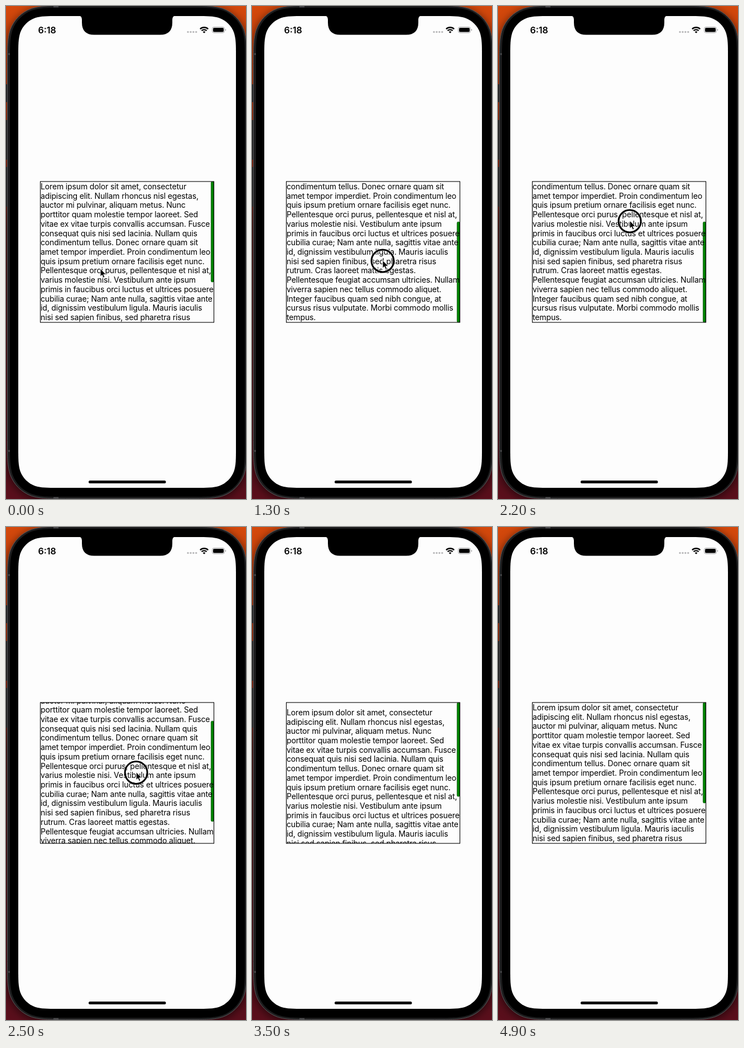
An HTML page for the animation above (5 s loop, 430x882 px).

```html
<!DOCTYPE html>
<html lang="en">
<head>
<meta charset="utf-8">
<title>Scroll indicator</title>
<style>
  html, body { margin: 0; width: 100%; height: 100%; overflow: hidden; background: #000; }
  svg { display: block; width: 430px; height: 882px; }
  text { font-family: Inter, "Open Sans", sans-serif; fill: #000; }
  #copy { font-size: 14px; letter-spacing: -0.14px; }
  #body { filter: drop-shadow(0 3px 8px rgba(0, 0, 0, .6)); }
</style>
</head>
<body>
<svg viewBox="0 0 430 882">
  <defs>
    <linearGradient id="wall" x2="0" y2="1">
      <stop offset="0" stop-color="#d4490c"/>
      <stop offset=".2" stop-color="#b5340a"/>
      <stop offset=".35" stop-color="#8a200c"/>
      <stop offset=".45" stop-color="#4a1210"/>
      <stop offset="1" stop-color="#5a0f1c"/>
    </linearGradient>
    <clipPath id="view"><rect x="61.5" y="314" width="311" height="252"/></clipPath>
  </defs>

  <rect width="430" height="882" fill="url(#wall)"/>
  <g fill="#2b2b2b">
    <rect y="140" width="4" height="32"/>
    <rect y="204" width="4" height="71"/>
    <rect y="288" width="4" height="71"/>
  </g>
  <path id="body" fill="#1d1d1e" stroke="#59595b"/>
  <path d="M85 1h9M85 880h9M4 86h3M4 796h3" stroke="#48484a" stroke-width="3"/>
  <path id="bezel"/>
  <path id="screen" fill="#fdfdfd"/>
  <path d="M130 17q6 1 6 7v5.500q0 22 22 22h118q22 0 22-22v-5.500q0-6 6-7z"/>

  <text x="57.5" y="49" font-size="16" font-weight="600">6:18</text>
  <g id="signal" fill="#b9b9bb"></g>
  <path d="M347.8 41.2a10.3 10.3 0 0 1 14.4 0M350.5 44.2a6.5 6.5 0 0 1 9 0"
    fill="none" stroke="#000" stroke-width="2.3"/>
  <path d="M352.6 46.2a3.6 3.6 0 0 1 4.8 0l-2.4 2.6z"/>
  <rect x="369.5" y="37.500" width="22" height="10.500" rx="3.300" fill="none" stroke="#a5a5a7"/>
  <rect x="371" y="39" width="19" height="7.500" rx="1.800"/>
  <path d="M392.8 41q1.500.500 1.500 1.800t-1.500 1.800z" fill="#a5a5a7"/>
  <rect x="148" y="849" width="138.5" height="5" rx="2.5"/>

  <g clip-path="url(#view)">
    <rect id="bar" x="367.300" width="5" rx="2.500" fill="#008000" stroke="#0b4a0b" stroke-width=".6"/>
    <g id="copy"></g>
  </g>
  <rect x="61.5" y="314" width="311" height="252" fill="none" stroke="#000" stroke-width="1.1"/>

  <g id="pointer">
    <g id="ring" fill="none">
      <circle r="20" cy="1" stroke="#fff" stroke-opacity=".6" stroke-width="5"/>
      <circle r="20" cy="1" stroke="#000" stroke-width="3"/>
    </g>
    <path d="M0 0v14.2l3.2-3 2.2 5 2.5-1.1-2.2-4.8h4.5z" stroke="#fff"/>
  </g>
</svg>
<script>
const LOOP = 5000, STEP = 100;
const TOP = 314, VIEW = 252, PITCH = 16.71, BAR = 180;

const lines = `Lorem ipsum dolor sit amet, consectetur
adipiscing elit. Nullam rhoncus nisl egestas,
auctor mi pulvinar, aliquam metus. Nunc
porttitor quam molestie tempor laoreet. Sed
vitae ex vitae turpis convallis accumsan. Fusce
consequat quis nisi sed lacinia. Nullam quis
condimentum tellus. Donec ornare quam sit
amet tempor imperdiet. Proin condimentum leo
quis ipsum pretium ornare facilisis eget nunc.
Pellentesque orci purus, pellentesque et nisl at,
varius molestie nisi. Vestibulum ante ipsum
primis in faucibus orci luctus et ultrices posuere
cubilia curae; Nam ante nulla, sagittis vitae ante
id, dignissim vestibulum ligula. Mauris iaculis
nisi sed sapien finibus, sed pharetra risus
rutrum. Cras laoreet mattis egestas.
Pellentesque feugiat accumsan ultricies. Nullam
viverra sapien nec tellus commodo aliquet.
Integer faucibus quam sed nibh congue, at
cursus risus vulputate. Morbi commodo mollis
tempus.`.split('\n');
const END = (lines.length - 15) * PITCH;

// Pointer stops; each press is followed by its release.
const stops = [
  { ms: 0, x: 169, y: 470 },
  { ms: 300, x: 226, y: 466 }, { ms: 800, x: 233, y: 338 },
  { ms: 1300, x: 234, y: 455 }, { ms: 1600, x: 235, y: 425 },
  { ms: 2200, x: 236, y: 384 }, { ms: 3100, x: 225, y: 594 },
  { ms: 3400, x: -30, y: 700 }
];

const $ = id => document.getElementById(id);
const copy = $('copy'), bar = $('bar'), pointer = $('pointer'), ring = $('ring');

function add(parent, tag, attrs) {
  const el = document.createElementNS('http://www.w3.org/2000/svg', tag);
  for (const name in attrs) el.setAttribute(name, attrs[name]);
  return parent.appendChild(el);
}

// Rounded rectangle whose corners blend smoothly into the sides.
function smoothRect(x, y, w, h, r) {
  const corner = (px, py, ux, uy, vx, vy) => {
    const at = (u, v) => `${px + r * (u * ux + v * vx)} ${py + r * (u * uy + v * vy)} `;
    return 'L' + at(1.529, 0) +
      'C' + at(1.088, 0) + at(.868, 0) + at(.631, .075) +
      'C' + at(.373, .169) + at(.169, .373) + at(.075, .631) +
      'C' + at(0, .868) + at(0, 1.088) + at(0, 1.529);
  };
  const path = corner(x, y, 0, 1, 1, 0) + corner(x + w, y, -1, 0, 0, 1) +
    corner(x + w, y + h, 0, -1, -1, 0) + corner(x, y + h, 1, 0, 0, -1);
  return 'M' + path.slice(1) + 'Z';
}

$('body').setAttribute('d', smoothRect(2.5, -.5, 429, 882, 68));
$('bezel').setAttribute('d', smoothRect(7, 3, 421, 875, 63));
$('screen').setAttribute('d', smoothRect(22, 18, 390, 844, 47));
for (let i = 0; i < 4; i++) add($('signal'), 'circle', { cx: 326 + i * 4.9, cy: 46.5, r: 1.7 });
lines.forEach((line, i) => {
  add(copy, 'text', { x: 62, y: 328 + i * PITCH }).textContent = line;
});

const mix = (a, b, k) => a + (b - a) * k;
const clamp = offset => Math.max(0, Math.min(END, offset));

function pointerAt(t) {
  const i = stops.findIndex(s => s.ms > t);
  if (i < 0) return null;
  const a = stops[i - 1], b = stops[i];
  const k = (t - a.ms) / (b.ms - a.ms), ease = k * k * (3 - 2 * k);
  return { x: mix(a.x, b.x, ease), y: mix(a.y, b.y, ease) };
}

// Past either edge the content follows the finger less and less.
function rubber(offset) {
  const edge = clamp(offset), over = offset - edge;
  return edge + over / (1 + 0.756 * Math.abs(over) / VIEW) * 0.756;
}

function scrollAt(t) {
  let rest = 0, offset = 0, touching = false;
  for (let i = 1; i < stops.length - 1; i += 2) {
    const press = stops[i], release = stops[i + 1];
    if (t < press.ms) break;
    touching = t < release.ms;
    const y = touching ? pointerAt(t).y : release.y;
    offset = rubber(rest + press.y - y);
    if (touching) break;
    rest = clamp(offset);
    const w = 0.0086 * (t - release.ms);
    offset = rest + (offset - rest) * (1 + w) * Math.exp(-w);
  }
  return { offset, touching };
}

function draw(t) {
  const { offset, touching } = scrollAt(t);
  const inside = clamp(offset), over = Math.abs(offset - inside);
  const height = BAR - 1.45 * over / (1 + 0.0106 * over);
  copy.setAttribute('transform', `translate(0 ${-offset})`);
  bar.setAttribute('height', height);
  bar.setAttribute('y', TOP + inside / END * (VIEW - height));

  const p = pointerAt(t);
  pointer.style.display = p ? '' : 'none';
  if (p) pointer.setAttribute('transform', `translate(${p.x} ${p.y})`);
  ring.style.display = touching ? '' : 'none';
}

const start = performance.now();
function tick() {
  const t = (performance.now() - start) % LOOP;
  draw(Math.floor(t / STEP) * STEP);
  requestAnimationFrame(tick);
}
draw(0);
requestAnimationFrame(tick);
</script>
</body>
</html>
```
